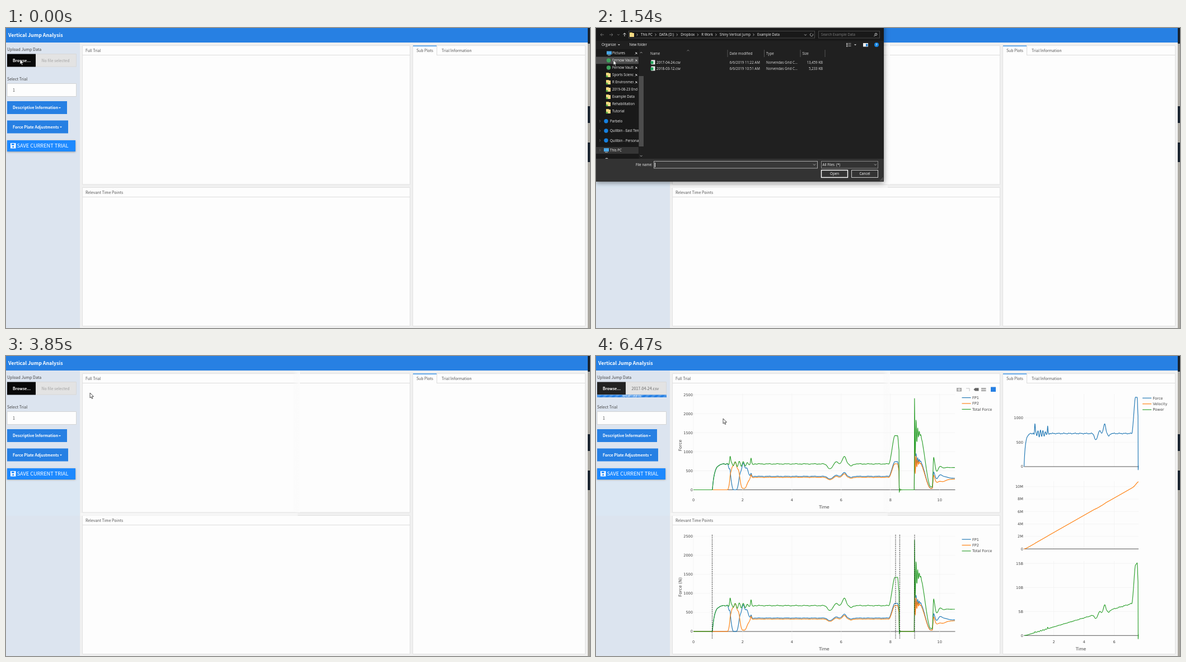
Animation of 1043 by 537 pixels, one loop 6520 ms. Source, as an HTML page with a canvas:

```html
<!DOCTYPE html>
<html lang="en">
<head>
<meta charset="utf-8">
<title>Vertical Jump Analysis</title>
<style>
html, body { margin: 0; overflow: hidden; background: #f0f0f0 }
canvas { display: block }
</style>
</head>
<body>
<canvas width="1043" height="537"></canvas>
<script>
const stage = document.querySelector('canvas').getContext('2d');
const layer = document.createElement('canvas');
layer.width = 514;
layer.height = 300;
const dialogLayer = layer.getContext('2d', { alpha: false });
let c = stage;

const LOOP = 6520;
const APP = '"Noto Sans CJK SC", "Noto Sans CJK JP", "Noto Sans CJK", sans-serif';
const WIN = '"Open Sans", sans-serif';
const PLOT = '"DejaVu Sans", sans-serif';
const BLUE = '#2780e3';
const COLORS = ['#1f77b4', '#ff7f0e', '#2ca02c'];

const clamp = v => Math.max(0, Math.min(1, v));
function ease(t, from, to) {
  const p = clamp((t - from) / (to - from));
  return p * p * (3 - 2 * p);
}
const bump = (t, center, width, height) => height * Math.exp(-(((t - center) / width) ** 2));

// Drawing helpers; text is centred vertically on y and returns its width.
function text(s, x, y, size, color, font = APP, align = 'left', weight = 400) {
  c.font = `${weight} ${size}px ${font}`;
  c.fillStyle = color;
  c.textAlign = align;
  c.fillText(s, x, y + size * 0.36);
  return c.measureText(s).width;
}
function rect(x, y, w, h, fill) {
  c.fillStyle = fill;
  c.fillRect(x, y, w, h);
}
function frame(x, y, w, h, stroke, width = 1) {
  c.strokeStyle = stroke;
  c.lineWidth = width;
  c.strokeRect(x, y, w, h);
}
function line(points, color, width = 1) {
  c.beginPath();
  points.forEach(([x, y]) => c.lineTo(x, y));
  c.strokeStyle = color;
  c.lineWidth = width;
  c.stroke();
}
function poly(points, fill) {
  c.beginPath();
  points.forEach(([x, y]) => c.lineTo(x, y));
  c.closePath();
  c.fillStyle = fill;
  c.fill();
}
function dot(x, y, r, fill) {
  c.beginPath();
  c.arc(x, y, r, 0, 7);
  c.fillStyle = fill;
  c.fill();
}
const caret = (x, y, color) => poly([[x - 2, y - 1], [x + 2, y - 1], [x, y + 1]], color);
function chevron(x, y, color, turn = 0) {
  c.save();
  c.translate(x, y);
  c.rotate(turn * Math.PI / 2);
  line([[-1.9, -1], [0, 1], [1.9, -1]], color, 0.8);
  c.restore();
}

// Force in newtons: stepping on, quiet standing, countermovement, push-off, flight, landing.
const TAKEOFF = 8.36, TOUCHDOWN = 8.98, REBOUND = 9.7;
function force(t) {
  if (t < 0.77) return 0;
  if (t < TAKEOFF) {
    const settling = 65 * Math.sin(t * 38) * Math.exp(-(((t - 1.85) / 0.42) ** 2));
    const sway = 6 * Math.sin(t * 17) + 4 * Math.sin(t * 41);
    const dip = bump(t, 5.55, 0.13, -130) + bump(t, 5.8, 0.08, 70) + bump(t, 6.13, 0.1, 200) + bump(t, 6.4, 0.09, -55);
    const steps = bump(t, 1.49, 0.03, 200) + bump(t, 2.34, 0.025, 130);
    return 680 * (1 - Math.exp((0.77 - t) / 0.09)) + settling + sway + dip + steps
      + 740 * ease(t, 7.93, 8.19) - 400 * ease(t, 8.29, TAKEOFF);
  }
  if (t < TOUCHDOWN) return -65 * Math.exp((TAKEOFF - t) * 35) * Math.cos((t - TAKEOFF) * 110);
  const u = t - TOUCHDOWN;
  if (t < REBOUND) return 1480 - 1400 * ease(t, 9.18, 9.64) + 920 * Math.exp(-u / 0.07) * Math.cos(u * 97);
  const v = t - REBOUND - 0.06;
  return 80 + ease(t, REBOUND, REBOUND + 0.06) * (505 + 270 * Math.exp(-v / 0.13) * Math.cos(v * 22));
}
// Part of the force on plate 1 while the weight shifts between the feet.
const share = t => 1 - ease(t, 1.38, 1.63) + 0.95 * ease(t, 1.74, 2) - 0.43 * ease(t, 2.06, 2.35) + bump(t, 10.05, 0.25, 0.12);

const times = Array.from({ length: 1063 }, (_, i) => i / 100);
const total = times.map(force);
const plate1 = times.map((t, i) => total[i] * share(t));
const plate2 = total.map((v, i) => v - plate1[i]);

// Velocity accumulates the force from the jump start; power is their product.
const jumpForce = total.slice(77, 839);
let sum = 0;
const velocity = jumpForce.map(v => sum += v * 20.2 / 1e6);
const power = jumpForce.map((v, i) => v * velocity[i] / 1e3);

function plot(values, x0, dx, y0, dy, color) {
  line(values.map((v, i) => [x0 + i * dx / 100, y0 - v * dy]), color, 1.15);
}
const tick = (s, x, y, align) => text(s, x, y, 6.6, '#444', PLOT, align);
const axisTitle = (s, x, y) => text(s, x, y, 7.6, '#444', PLOT, 'center');
function legend(x, y, names) {
  names.forEach((name, i) => {
    line([[x, y + i * 10.4], [x + 16, y + i * 10.4]], COLORS[i], 1.15);
    tick(name, x + 18.5, y + i * 10.4);
  });
}

function forceChart(dy, title, marked) {
  c.save();
  c.translate(0, dy);
  for (let i = 0; i <= 5; i++) {
    const x = 174 + i * 87.94, y = 239.5 - i * 34.05;
    line([[x, 67], [x, 253]], '#f0f0f0', 0.6);
    line([[174, y], [641.5, y]], i ? '#eee' : '#555', i ? 0.6 : 1);
    tick(i * 2, x, 258, 'center');
    tick(i * 500, 173, y, 'right');
  }
  [plate1, plate2, total].forEach((v, i) => plot(v, 174, 43.97, 239.5, 0.0681, COLORS[i]));
  axisTitle('Time', 407.5, 270.7);
  legend(653.5, 74.6, ['FP1', 'FP2', 'Total Force']);
  if (marked) {
    c.setLineDash([1.7, 1.7]);
    [207.5, 535, 542.5, 569].forEach(x => line([[x, 66.5], [x, 253.5]], '#222', 1.1));
    c.setLineDash([]);
  }
  c.translate(150.5, 160);
  c.rotate(-Math.PI / 2);
  axisTitle(title, 0, 0);
  c.restore();
}

function subChart(i, values, top, y0, scale, step, count, unit) {
  for (let n = 2; n <= 6; n += 2) line([[763.5 + n * 27, top], [763.5 + n * 27, y0]], '#f0f0f0', 0.6);
  for (let n = 0; n <= count; n++) {
    const y = y0 - n * step * scale;
    line([[764.5, y], [969, y]], n ? '#eee' : '#555', n ? 0.6 : 1);
    tick(n ? n * step + unit : '0', 763, y, 'right');
  }
  plot(values, 764.5, 26.85, y0, scale, COLORS[i]);
}
function subPlots() {
  subChart(0, jumpForce, 68, 198, 0.0872, 500, 2, '');
  subChart(1, velocity, 224, 345.3, 11.15, 2, 5, 'M');
  subChart(2, power, 367, 500.3, 8.6, 5, 3, 'B');
  for (let n = 2; n <= 6; n += 2) tick(n, 763.5 + n * 27, 512, 'center');
  axisTitle('Time', 866, 524.5);
  legend(976, 75.3, ['Force', 'Velocity', 'Power']);
}
function modeBar(alpha) {
  c.globalAlpha = alpha;
  rect(644, 57, 9, 6.5, '#aaa');
  dot(648.5, 60.3, 2, '#fff');
  dot(648.5, 60.3, 1.1, '#aaa');
  line([[661, 58], [667, 58], [667, 63]], '#bbb', 0.9);
  poly([[674.5, 60], [677, 57.3], [683.5, 57.3], [683.5, 62.5], [677, 62.5]], '#666');
  rect(688, 57, 8.5, 2.6, '#aaa');
  rect(688, 60.6, 8.5, 2.6, '#aaa');
  rect(705, 55.5, 9, 8.5, BLUE);
  c.globalAlpha = 1;
}

const formText = (s, x, y, color = '#444') => text(s, x, y, 7.05, color);
const boldText = (s, x, y) => text(s, x, y, 6.95, '#fff', APP, 'left', 700);
const panelText = (s, x, y) => text(s, x, y, 6.85, '#555');

function panel(x, y, w, h) {
  rect(x, y, w, h, '#fdfdfd');
  frame(x, y, w, h, '#e1e1e1');
  line([[x, y + 17], [x + w, y + 17]], '#dcdcdc');
}
function button(label, y, w) {
  rect(2, y, w, 23, BLUE);
  boldText(label, 12, y + 11.7);
  caret(w - 11, y + 12, '#fff');
}
function wallpaper() {
  rect(1039, 0, 4, 537, '#aba8a1');
  [[0, 28], [140, 30], [205, 35]].forEach(([y, h]) => rect(1039, y, 4, h, '#18222e'));
}

function uploadBar(t) {
  const w = 124 * (1 - (1 - clamp((t - 4200) / 230)) ** 3);
  rect(2, 69.3, 124, 4.7, '#d3d9e2');
  c.save();
  c.beginPath();
  c.rect(2, 69.3, w, 4.7);
  c.clip();
  rect(2, 69.3, 124, 4.7, BLUE);
  for (let x = 0; x < 130; x += 10.8)
    poly([[x, 74], [x + 5.4, 74], [x + 10, 69.3], [x + 4.6, 69.3]], 'rgba(255,255,255,.16)');
  text(t < 4760 ? '2017-04-24.csv' : 'Upload complete', 2 + w / 2, 71.7, 4, '#fff', APP, 'center', 700);
  c.restore();
}

function sidebar(t) {
  const loaded = t >= 4220;
  rect(0, 26, 132, 511, '#dce4ef');
  formText('Upload Jump Data', 2, 38);
  rect(2, 46.5, 51, 23, loaded ? '#222' : '#080808');
  rect(53, 46.5, 73, 23, '#e3e3e3');
  frame(53.5, 46.5, 72, 22.5, '#d8d8d8');
  boldText('Browse...', 12, 58);
  if (loaded) {
    formText('2017-04-24.csv', 63.5, 58, '#666');
    uploadBar(t);
  } else formText('No file selected', 63.5, 58, '#a2a2a2');

  formText('Select Trial', 2, 91);
  rect(2, 99.5, 124, 23, '#fdfdfd');
  frame(2, 99.5, 123.5, 23, '#ccc', 0.8);
  formText('1', 12, 111.3);
  button('Descriptive Information', 131, 107);
  button('Force Plate Adjustments', 165.5, 109);

  c.save();
  c.shadowColor = 'rgba(0,0,0,.35)';
  c.shadowBlur = 3;
  c.shadowOffsetY = 1;
  rect(2, 201, 122, 20, '#1d89ff');
  c.restore();
  rect(8, 206, 9.5, 9.5, '#fff');
  rect(10, 207, 4.7, 2.7, '#1d89ff');
  dot(12.7, 212.7, 1.5, '#1d89ff');
  text('SAVE CURRENT TRIAL', 19.5, 211, 9.2, '#fff');
}

// Soft trace left by the dialog's shadow.
function shadowTrace() {
  const g = c.createLinearGradient(511, 0, 525, 0);
  g.addColorStop(0, 'rgba(246,246,246,0)');
  g.addColorStop(1, 'rgba(252,252,252,.9)');
  rect(511, 27, 14, 253, g);
  rect(133, 281, 388, 5, 'rgba(250,250,250,.65)');
  rect(0, 222, 132, 64, 'rgba(218,232,245,.45)');
}

function page(t) {
  rect(0, 0, 1043, 537, '#f0f0f0');
  rect(0, 0, 1039, 26, BLUE);
  text('Vertical Jump Analysis', 4, 12.7, 8.8, '#fff', APP, 'left', 700);
  wallpaper();
  sidebar(t);

  panel(136.5, 31.5, 585, 248.5);
  panel(136.5, 285.5, 585, 248);
  panel(726.5, 31.5, 308, 502);
  rect(727, 32, 42, 18, '#fdfdfd');
  rect(727, 31.2, 42, 1.8, '#5aa3e8');
  line([[769.5, 32], [769.5, 49]], '#ddd');
  panelText('Full Trial', 142, 41);
  panelText('Relevant Time Points', 142, 294.7);
  panelText('Sub Plots', 733, 41);
  panelText('Trial Information', 778, 41);

  if (t >= 1310) shadowTrace();
  if (t >= 4910) {
    forceChart(0, 'Force');
    modeBar(clamp((t - 4860) / 450));
  }
  if (t >= 5000) forceChart(253.6, 'Force (N)', true);
  if (t >= 5100) subPlots();
}

const label = (s, x, y, color = '#f0f0f0', align) => text(s, x, y, 6.2, color, WIN, align);
function folder(x, y) {
  rect(x, y - 4, 5, 2, '#e8c65a');
  rect(x, y - 3, 8, 7, '#f7db85');
}
function arrow(x, y, angle, color) {
  c.save();
  c.translate(x, y);
  c.rotate(angle);
  line([[-3, 0], [3, 0]], color, 0.9);
  line([[.5, -2.5], [3, 0], [.5, 2.5]], color, 0.9);
  c.restore();
}
function screen(x, y) {
  rect(x, y - 3.5, 9, 6, '#4aa8e8');
  rect(x + 2, y + 3.2, 5, 1, '#bbb');
}

const places = ['Pictures', 'Fernow Vault', 'Fernow Vault', 'Sports Scienc', 'R Environmen', '2019-08-23 End o',
  'Example Data', 'Rehabilitation', 'Tutorial'];
const drives = ['Parbelo', 'Quillbin - East Tennessee', 'Quillbin - Personal', 'This PC'];

function navigation(t) {
  const [mx, my] = pointer(t);
  rect(0, 38, 85, 196, '#191919');
  rect(0, 213, 76, 12, '#353535');
  c.save();
  c.beginPath();
  c.rect(0, 38, 76, 196);
  c.clip();
  places.forEach((name, i) => {
    const y = 45 + i * 13;
    const back = mx < 76 && Math.abs(my - y) < 6.5 ? '#4d4d4d' : '#191919';
    rect(0, y - 6.5, 76, 13, back);
    if (i === 0) screen(19, y);
    else if (i < 3) dot(22.5, y, 3.7, '#3fa35c');
    else {
      folder(18, y);
      dot(19.5, y + 2.5, 1.8, '#52b043');
    }
    label(name, 29, y);
    if (i < 5) {
      rect(67, y - 5, 9, 10, back);
      line([[69.5, y + 2.5], [73.5, y - 1.5]], '#ccc', 0.8);
      line([[70.5, y - 1.5], [73.5, y + 1.5]], '#ccc', 1.2);
    }
  });
  drives.forEach((name, i) => {
    const y = 166.7 + i * 17.3;
    chevron(7, y, '#666', -1);
    if (i < 3) dot(18, y, 3.7, '#1580e0');
    else screen(14, y);
    label(name, 25, y);
  });
  dot(19, 235.5, 3, '#bbb');
  c.restore();
  rect(76.5, 38, 8.5, 196, '#202020');
  rect(76.5, 86, 8.5, 126, '#4d4d4d');
  chevron(80.7, 229, '#bbb');
  chevron(80.7, 44, '#bbb', 2);
}

const columns = [['Name', 97], ['Date modified', 238.5], ['Type', 304], ['Size', 368.5]];
const files = [['2017-04-24.csv', '6/6/2019 11:22 AM', '13,459 KB'], ['2018-03-12.csv', '6/6/2019 10:51 AM', '5,233 KB']];

function fileList(t) {
  const [mx, my] = pointer(t);
  rect(85, 23, 429, 211, '#202020');
  columns.forEach(([name, x], i) => {
    label(name, x, 45.5, '#ddd');
    if (i) line([[x - 3.5, 39], [x - 3.5, 52]], '#555');
  });
  line([[409, 39], [409, 52]], '#555');
  chevron(164.5, 40.3, '#999', 2);
  files.forEach(([name, date, size], i) => {
    const y = 61.3 + i * 11.2;
    if (mx > 95 && Math.abs(my - y) < 5.6) rect(95, y - 5.8, 312, 11.5, t >= 3560 ? '#777' : '#4d4d4d');
    rect(98.5, y - 4, 7, 8, '#eee');
    rect(97.5, y - 2, 5, 5, '#21a35b');
    label(name, 108, y);
    label(date, columns[1][1], y, '#ddd');
    label('Norvendas Grid C...', columns[2][1], y, '#ddd');
    label(size, 405, y, '#ddd', 'right');
  });
}

function dialogHeader() {
  rect(0, -25, 514, 48, '#191919');
  rect(0, 23, 514, 15, '#202020');
  arrow(11, 12, Math.PI, '#777');
  arrow(27, 12, 0, '#777');
  chevron(40, 12, '#777');
  arrow(51, 12, -Math.PI / 2, '#eee');
  frame(58.5, 5.5, 332, 12.5, '#484848');
  folder(60, 12);
  let x = 80;
  ['This PC', 'DATA (D:)', 'Dropbox', 'R Work', 'Shiny Vertical Jump', 'Example Data'].forEach(s => {
    chevron(x - 6.5, 12, '#ccc', -1);
    x += label(s, x, 11.7) + 12;
  });
  chevron(374, 12.3, '#ccc');
  c.beginPath();
  c.arc(385, 12, 2.6, -.6, 4.6);
  c.strokeStyle = '#ccc';
  c.lineWidth = 0.8;
  c.stroke();
  frame(397.5, 5.5, 109, 12.5, '#484848');
  label('Search Example Data', 402, 12, '#7d7d7d');
  c.beginPath();
  c.arc(500, 11.3, 1.9, 0, 7);
  c.strokeStyle = '#ccc';
  c.stroke();
  line([[498.6, 12.7], [496.5, 15]], '#ccc');

  label('Organize', 10, 30);
  caret(41, 30.3, '#ddd');
  label('New folder', 59.5, 30);
  for (let y = 27; y < 33; y += 2.5) {
    rect(447, y, 2.5, 1.5, '#ccc');
    rect(450.5, y, 5, 1, '#999');
  }
  caret(463, 30.3, '#ddd');
  rect(477, 27, 9, 6.5, '#eee');
  rect(482, 28.5, 3.3, 4.2, '#1e7fd6');
  dot(501, 30, 4, '#1483e0');
  text('?', 501, 30, 6, '#fff', WIN, 'center', 700);
}

const inputBox = [103.5, 238.5, 292, 12.5], filterBox = [402.5, 238.5, 101, 12.5];
const openBox = [402.5, 254.5, 47, 13], cancelBox = [456.5, 254.5, 47, 13];

function dialogFooter(t) {
  rect(0, 234, 514, 41, '#333');
  label('File name:', 100.5, 244.7, '#f0f0f0', 'right');
  rect(...inputBox, '#383838');
  frame(...inputBox, '#aaa');
  frame(...filterBox, '#888');
  frame(...openBox, '#fff', 1.4);
  frame(...cancelBox, '#ccc');
  const caretOn = t < 1850 || Math.floor((t - 1850) / 510) % 2;
  if (t >= 3560) label('2017-04-24.csv', 105.5, 244.7);
  else if (caretOn) rect(105, 241, 1, 8, '#fff');
  chevron(390, 244.7, '#ccc');
  label('All Files  (*)', 404.5, 244.7);
  chevron(499, 244.7, '#ccc');
  label('Open', 426, 261, '#fff', 'center');
  label('Cancel', 480, 261, '#fff', 'center');
  for (let i = 0; i < 3; i++)
    for (let j = 0; j <= i; j++) rect(511.5 - j * 2, 268 + i * 2, 1, 1, '#999');
}

function blankDialog() {
  rect(0, -25, 514, 28, '#000');
  rect(0, 3, 514, 231, '#fff');
  rect(0, 234, 514, 41, '#333');
  rect(70, 240, 31, 9, '#fff');
  rect(505, 266, 9, 9, '#fff');
  [inputBox, filterBox, openBox, cancelBox].forEach(box => rect(...box, '#fff'));
}

// The window is painted opaque on its own layer, then faded and scaled as a whole.
function dialog(t) {
  if (t < 1180 || t > 3840) return;
  c = dialogLayer;
  c.setTransform(1, 0, 0, 1, 0, 25);
  if (t < 1260) blankDialog();
  else {
    fileList(t);
    dialogHeader();
    fileListHeading();
    navigation(t);
    dialogFooter(t);
  }
  c = stage;
  const opening = clamp((t - 1150) / 250);
  const closing = clamp((t - 3695) / 150);
  const scale = 1 - 0.066 * (1 - opening) ** 2 - 0.047 * closing;
  c.save();
  c.translate(257, 120);
  c.scale(scale, scale);
  c.globalAlpha = clamp(1.33 * opening) * (1 - closing);
  c.shadowColor = 'rgba(0,0,0,.45)';
  c.shadowBlur = 9;
  c.shadowOffsetY = 2;
  c.drawImage(layer, -257, -145);
  c.restore();
}
function fileListHeading() {
  line([[85, 38], [85, 234]], '#202020');
}

// Each move adds its eased offset to the pointer: start, duration, dx, dy.
const moves = [[890, 140, 0.5, 1], [1400, 1120, 124.5, 9], [4220, 590, 3, 7], [5910, 280, 69, 26], [6469, 1, 5, 13]];
const pointer = t => moves.reduce(([x, y], [start, span, dx, dy]) => {
  const p = ease(t, start, start + span);
  return [x + dx * p, y + dy * p];
}, [25, 56]);

function cursor(t) {
  const [x, y] = pointer(t);
  const shape = [[0, 0], [0, 9], [2, 7.2], [3.4, 10.4], [4.9, 9.8], [3.5, 6.7], [6.4, 6.5]]
    .map(([dx, dy]) => [x + dx, y + dy]);
  poly(shape, '#fff');
  line([...shape, shape[0]], '#222', 0.8);
}

stage.lineJoin = 'round';
function draw() {
  const t = performance.now() % LOOP;
  page(t);
  dialog(t);
  cursor(t);
  requestAnimationFrame(draw);
}
draw();
</script>
</body>
</html>
```
